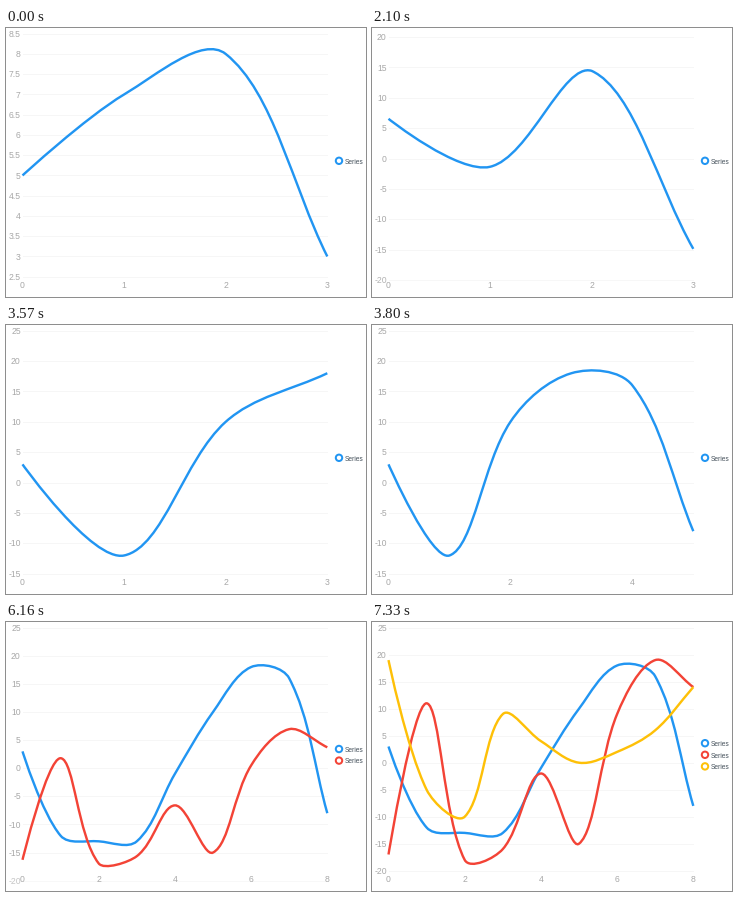
Recreate the animation shown at these times as a matplotlib script. Size 360 by 269 pixels, loop 7.92 s.

```python
import numpy as np
import matplotlib.pyplot as plt
from matplotlib.animation import FuncAnimation
from matplotlib.patches import Circle, PathPatch
from matplotlib.path import Path

W, H, DPI = 360, 269, 64
LOOP, TICK = 7920, 20
LEAD, DURATION = 28, 250  # ms
LEFT, RIGHT, TOP, BOTTOM = 16.5, 321.3, 5.7, 248.7
SMOOTH = 0.7
COLORS = ["#2195f2", "#f34336", "#fec007"]
GRID, LABEL, LEGEND = "#f6f6f6", "#a8a8a8", "#46525c"
FONT = "Liberation Sans"

BLUE = [3, -12, -13, -13, -1, 10, 18, 16, -8]
RED = [-17, 11, -18, -16, -2, -15, 9, 19, 14]
YELLOW = [19, -5, -10, 9, 4, 0, 2, 6, 14]

# start ms, (y low, y high, y step), x step, series values
STAGES = [
    (-DURATION, (2.5, 8.5, 0.5), 1, [[5, 7, 8, 3]]),
    (1180, (-20, 20, 5), 1, [[7, 0, 15, -19]]),
    (2100, (-15, 25, 5), 1, [[3, -12, 10, 18]]),
    (3570, (-15, 25, 5), 2, [[3, -12, 10, 18, 16, -8]]),
    (4620, (-15, 25, 5), 2, [BLUE]),
    (6020, (-20, 25, 5), 2, [BLUE, RED]),
    (6600, (-20, 25, 5), 2, [BLUE, RED, YELLOW]),
]


def px(size):
    return size * 72 / DPI


def mix(a, b, p):
    return a + (b - a) * p


def smooth(pts):
    """Cubic Bezier vertices through the points."""
    q = np.vstack([pts[:1], pts, pts[-1:]])
    mid = (q[1:] + q[:-1]) / 2
    dist = np.hypot(*np.diff(q, axis=0).T)
    out = [pts[0]]
    for i in range(len(pts) - 1):
        k1 = dist[i] / (dist[i] + dist[i + 1])
        k2 = dist[i + 1] / (dist[i + 1] + dist[i + 2])
        m1 = mix(mid[i], mid[i + 1], k1)
        m2 = mix(mid[i + 1], mid[i + 2], k2)
        out += [pts[i] + (mid[i + 1] - m1) * SMOOTH,
                pts[i + 1] + (mid[i + 1] - m2) * SMOOTH,
                pts[i + 1]]
    out[1] = pts[0]  # the opening handle has no length
    return np.array(out)


class View:
    """Scales, ticks and curves of one resting chart."""

    def __init__(self, y_axis, x_step, series):
        self.low, self.high, step = y_axis
        self.last = len(series[0]) - 1
        self.y_ticks = set(np.arange(self.low, self.high + step / 2, step).tolist())
        self.x_ticks = set(range(0, self.last + 1, x_step))
        self.curves = [smooth(np.array([(self.x(i), self.y(v))
                                        for i, v in enumerate(vals)]))
                       for vals in series]

    def x(self, v):
        return LEFT + (RIGHT - LEFT) * v / self.last

    def y(self, v):
        return BOTTOM - (BOTTOM - TOP) * (v - self.low) / (self.high - self.low)


VIEWS = [View(*s[1:]) for s in STAGES]


def ticks(old, new, old_pos, new_pos, p):
    """Yield value, position and opacity while two tick sets cross-fade."""
    for v in sorted(old | new):
        alpha = 1 if v in old and v in new else p if v in new else 1 - p
        if alpha > 0:
            yield v, mix(old_pos(v), new_pos(v), p), alpha


def morph(old, new, i, p):
    goal = new.curves[i]
    if i < len(old.curves):
        start = old.curves[i]
        extra = np.repeat(start[-1:], len(goal) - len(start), axis=0)
        start = np.vstack([start, extra])
    else:
        start = np.column_stack([goal[:, 0], np.full(len(goal), BOTTOM)])
    return mix(start, goal, p)


fig = plt.figure(figsize=(W / DPI, H / DPI), dpi=DPI, facecolor="white")
ax = fig.add_axes([0, 0, 1, 1])
shown = {"key": None}


def label(x, y, text, size, color, **kw):
    ax.text(x, y, text, fontsize=px(size), color=color, family=FONT,
            va="baseline", **kw)


def draw_axes(old, new, p):
    for v, y, a in ticks(old.y_ticks, new.y_ticks, old.y, new.y, p):
        if -8 < y < H + 8:
            ax.plot([LEFT, RIGHT], [y, y], color=GRID, lw=px(1), alpha=a)
            label(14.8, y + 3.1, f"{v:g}", 8.6, LABEL, ha="right", alpha=a)
    for v, x, a in ticks(old.x_ticks, new.x_ticks, old.x, new.x, p):
        if x < W + 5:
            label(x, 260.3, f"{v:g}", 8.6, LABEL, ha="center", alpha=a)


def draw_curves(old, new, p):
    for i, color in enumerate(COLORS[:len(new.curves)]):
        verts = morph(old, new, i, p)
        codes = [Path.MOVETO] + [Path.CURVE4] * (len(verts) - 1)
        ax.add_patch(PathPatch(Path(verts, codes), fc="none", ec=color,
                               lw=px(2.4), capstyle="butt", zorder=3 + i))


def draw_legend(count):
    for i in range(count):
        y = 132.8 + (i - (count - 1) / 2) * 11.6
        ax.add_patch(Circle((333, y), 3.2, fc="white", ec=COLORS[i],
                            lw=px(2), zorder=8))
        label(339.2, y + 2.7, "Series", 6.6, LEGEND, ha="left")


def update(frame):
    t = frame * TICK
    n = max(i for i, s in enumerate(STAGES) if t >= s[0])
    p = min(1, (t - STAGES[n][0] + LEAD) / DURATION)
    if shown["key"] == (n, p):
        return
    shown["key"] = (n, p)
    ax.clear()
    ax.set(xlim=(0, W), ylim=(H, 0))
    ax.axis("off")
    old, new = VIEWS[max(n - 1, 0)], VIEWS[n]
    draw_axes(old, new, p)
    draw_curves(old, new, p)
    draw_legend(len(new.curves))


anim = FuncAnimation(fig, update, frames=LOOP // TICK, interval=TICK,
                     repeat=True, repeat_delay=0, cache_frame_data=False)
plt.show()
```
